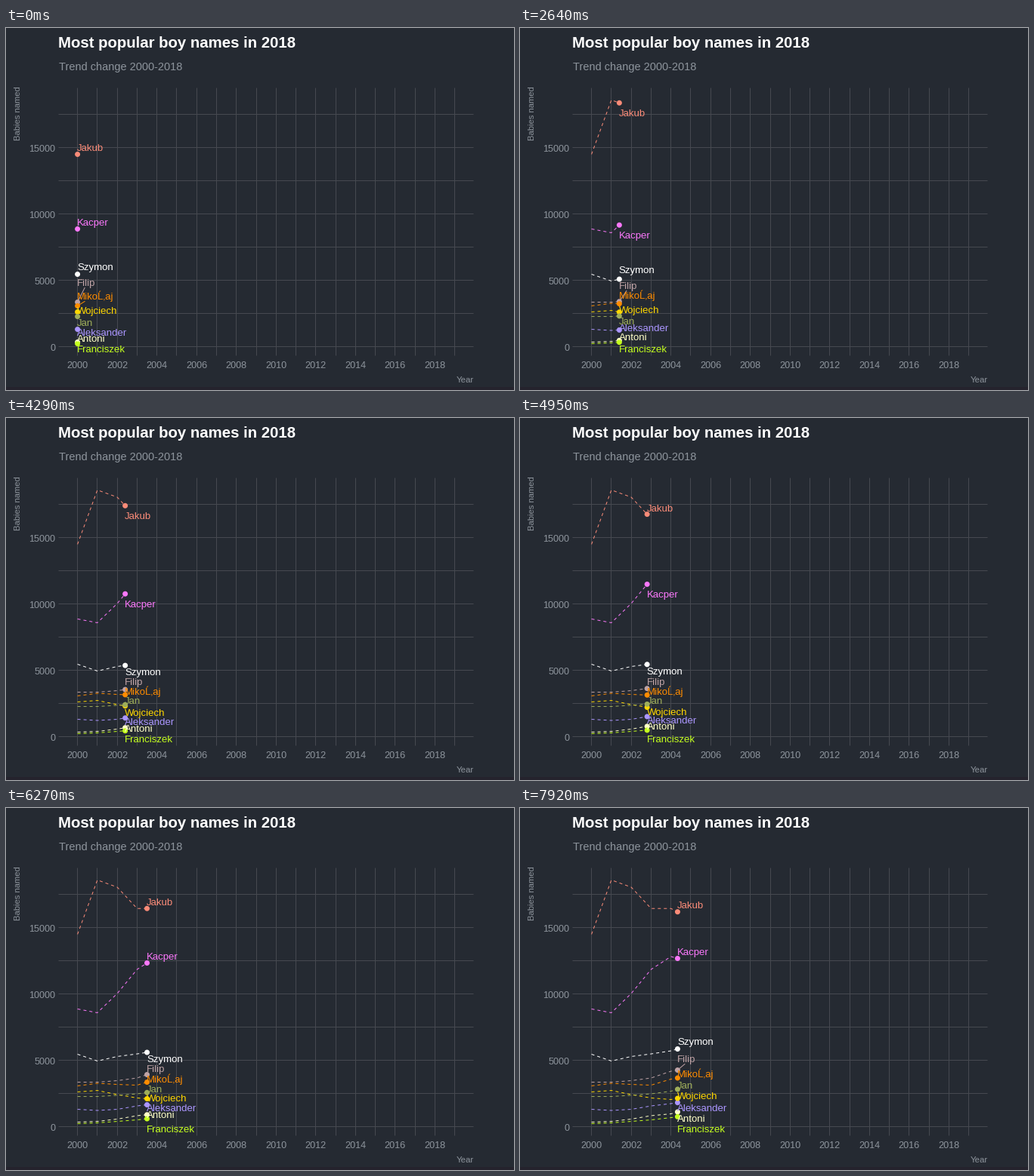
Write a matplotlib script that moves like this. It is 672x480 px and loops after 8000 ms.

```python
import numpy as np
import matplotlib.pyplot as plt
from matplotlib.animation import FuncAnimation

W, H, DPI = 672, 480, 96
LOOP, TICK, HOLD = 8000, 40, 330          # ms
BG, GRID, GREY = "#252a32", "#464950", "#8d949c"
X0, YEAR_W = 94.6, 26.27                  # pixel x of 2000, pixels per year
Y0, UNIT = 422.5, 88 / 5000               # pixel y of zero, pixels per baby

plt.rcParams["font.family"] = ["Liberation Sans", "DejaVu Sans"]

# steps at which each new year is reached
YEAR_STEPS = [0, 6, 11, 16, 22, 28]
# steps at which the label heights are given
LABEL_STEPS = [0, 4, 8, 13, 15, 19, 24]

COLORS = {
    "Aleksander": "#ab96ff", "Antoni": "#ffffc8", "Filip": "#bfa3a6",
    "Franciszek": "#c4ff1e", "Jakub": "#fa8b78", "Kacper": "#fb78fb",
    "MikoĹ‚aj": "#ff8c00", "Szymon": "#ffffff", "Wojciech": "#ffd700",
    "Jan": "#9fae5a",
}
# babies named in 2000..2005
COUNTS = {
    "Aleksander": [1305, 1220, 1305, 1560, 1735, 1960],
    "Antoni": [340, 395, 570, 825, 965, 1390],
    "Filip": [3350, 3350, 3465, 3665, 4175, 4430],
    "Franciszek": [225, 285, 395, 510, 680, 880],
    "Jakub": [14490, 18580, 18040, 16435, 16435, 15680],
    "Kacper": [8865, 8580, 10030, 11845, 12815, 12385],
    "MikoĹ‚aj": [3070, 3265, 3180, 3125, 3580, 3835],
    "Szymon": [5455, 4945, 5285, 5480, 5710, 6135],
    "Wojciech": [2615, 2725, 2415, 2160, 2045, 2300],
    "Jan": [2270, 2270, 2360, 2470, 2670, 3095],
}
LABEL_Y = {
    "Aleksander": [403, 397, 397, 402, 400, 397, 397],
    "Antoni": [411, 409, 409, 411, 408, 406, 411],
    "Filip": [337, 341, 341, 349, 349, 345, 332],
    "Franciszek": [425] * 7,
    "Jakub": [158, 110, 112, 129, 119, 124, 128],
    "Kacper": [257, 282, 274, 246, 233, 196, 190],
    "MikoĹ‚aj": [355, 354, 354, 362, 362, 359, 352],
    "Szymon": [316, 319, 320, 336, 335, 332, 309],
    "Wojciech": [374, 373, 373, 390, 389, 384, 381],
    "Jan": [390, 387, 388, 374, 374, 372, 367],
}


def px(size):
    return size * 72 / DPI


def year_at(step):
    return np.interp(step, YEAR_STEPS, range(len(YEAR_STEPS)))


def dot_y(name, year):
    counts = COUNTS[name]
    return Y0 - UNIT * np.interp(year, range(len(counts)), counts)


def label_y(name, step):
    """Label height; a label that changes side of its dot jumps across."""
    i = min(np.searchsorted(LABEL_STEPS, step, side="right"), len(LABEL_STEPS) - 1)
    a, b = LABEL_STEPS[i - 1], LABEL_STEPS[i]
    off_a = LABEL_Y[name][i - 1] - dot_y(name, year_at(a))
    off_b = LABEL_Y[name][i] - dot_y(name, year_at(b))
    u = (step - a) / (b - a)
    if off_a * off_b < 0:
        u = round(u)
    return dot_y(name, year_at(step)) + off_a + (off_b - off_a) * u


fig = plt.figure(figsize=(W / DPI, H / DPI), dpi=DPI, facecolor=BG)
ax = fig.add_axes([0, 0, 1, 1])
ax.set(xlim=(0, W), ylim=(H, 0))
ax.axis("off")


def write(x, y, text, size, color=GREY, **kw):
    kw.setdefault("va", "baseline")
    return ax.text(x, y, text, fontsize=px(size), color=color, **kw)


def draw_stage():
    ax.axhspan(476, H, color="#25232d", lw=0)
    # whole numbers snap to the pixel that holds the line
    ax.vlines(np.floor(X0 + YEAR_W * np.arange(20)), 79, 434, color=GRID, lw=px(1))
    ax.hlines(np.floor(Y0 - 44 * np.arange(8)), 69, 618, color=GRID, lw=px(1))
    for year in range(0, 19, 2):
        write(X0 + YEAR_W * year, 451, str(2000 + year), 12.6, ha="center")
    for count in range(0, 15001, 5000):
        write(65.5, Y0 - UNIT * count + 6, str(count), 12.6, ha="right")
    write(69, 26, "Most popular boy names in 2018", 20.4, "white", weight="bold")
    write(69.5, 56, "Trend change 2000-2018", 14.5)
    write(21, 77, "Babies named", 11.3, rotation=90, ha="right", va="top")
    write(618.5, 470, "Year", 11.4, ha="right")


draw_stage()

trails, leaders, labels = {}, {}, {}
for name, color in COLORS.items():
    trails[name], = ax.plot([], [], color=color, lw=px(1), dashes=(4, 4),
                            dash_capstyle="butt", zorder=3)
    leaders[name], = ax.plot([], [], color=color, lw=px(1), zorder=5)
    labels[name] = write(0, 0, name, 13.3, color, zorder=6)
dots = ax.scatter([0] * len(COLORS), [0] * len(COLORS), s=px(7) ** 2,
                  c=list(COLORS.values()), linewidths=0, zorder=4)


def leader(x, y, text_y):
    """Short stroke from a label to its dot, for labels pushed well above it."""
    if y - text_y < 13.2:
        return [], []
    start = np.array([x + 9.5, text_y + 7.5])
    gap = start - (x, y)
    end = (x, y) + gap / np.hypot(*gap) * 3
    return [start[0], end[0]], [start[1], end[1]]


def draw(frame):
    step = (frame * TICK + TICK - 1) // HOLD
    year = year_at(step)
    x = X0 + YEAR_W * year
    past = np.append(np.arange(np.ceil(year)), year)
    for name in COLORS:
        y, text_y = dot_y(name, year), label_y(name, step)
        trails[name].set_data(X0 + YEAR_W * past, dot_y(name, past))
        leaders[name].set_data(*leader(x, y, text_y))
        labels[name].set_position((x - 0.5, text_y + 5))
    dots.set_offsets([(x, dot_y(name, year)) for name in COLORS])
    return [dots, *trails.values(), *leaders.values(), *labels.values()]


anim = FuncAnimation(fig, draw, frames=LOOP // TICK, interval=TICK,
                     repeat=True, repeat_delay=0, blit=False)
plt.show()
```
